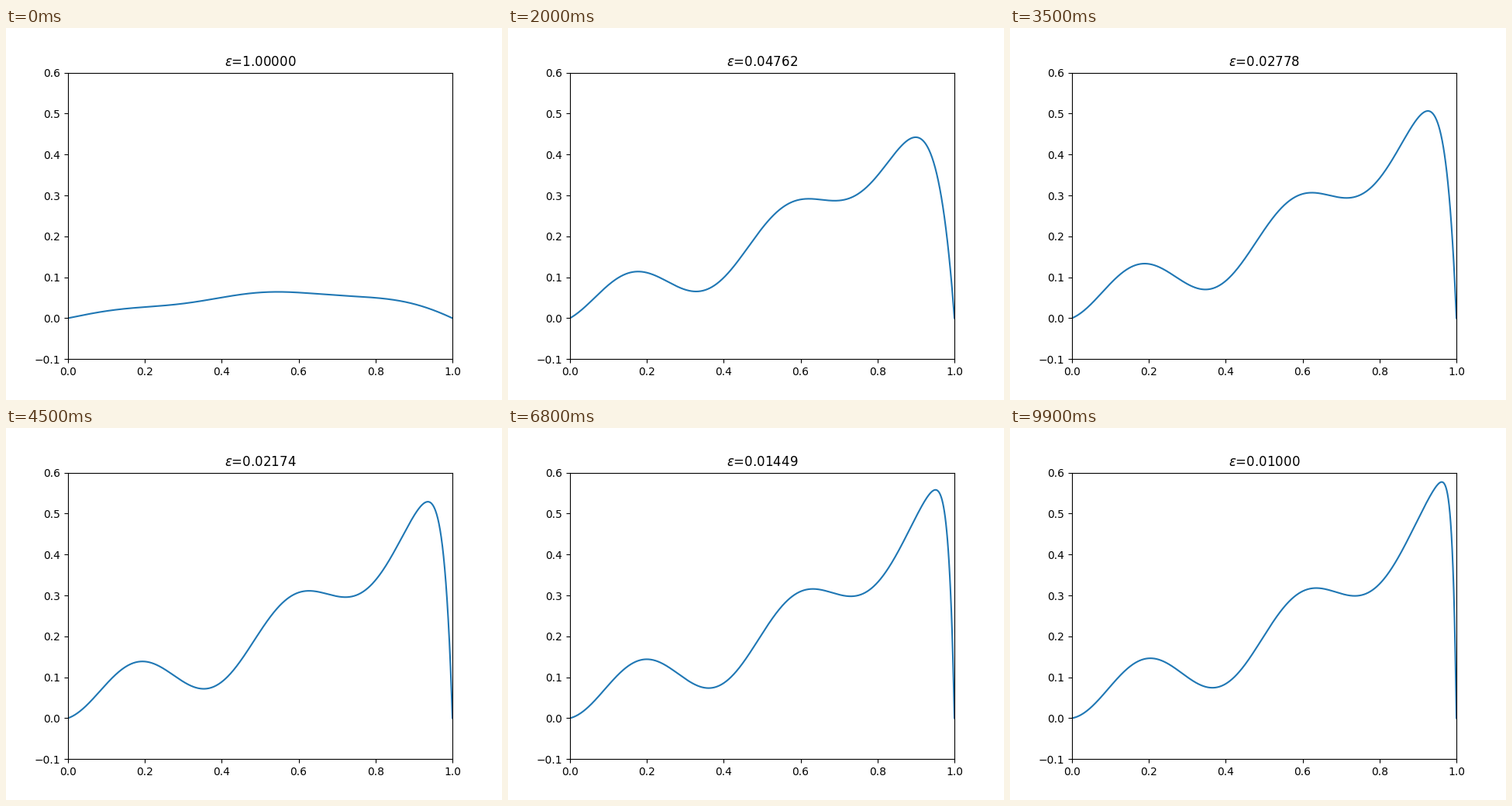
These frames come from a looping animation (640x480 px, 10 s). A matplotlib script:

```python
import numpy as np
import matplotlib.pyplot as plt
from matplotlib.animation import FuncAnimation

FRAMES, INTERVAL = 100, 100
K = 5 * np.pi
x = np.linspace(0, 1, 1001)


def solve(eps):
    """Solution of -eps u'' + u' = x + sin(5 pi x) with u(0) = u(1) = 0."""
    damp = 1 + (eps * K) ** 2
    a, b = -1 / (K * damp), eps / damp
    tail = np.exp(-1 / eps)
    layer = (2 * a - 0.5 - eps) / (1 - tail)
    const = -a - layer * tail
    smooth = x**2 / 2 + eps * x + a * np.cos(K * x) + b * np.sin(K * x)
    return smooth + const + layer * np.exp((x - 1) / eps)


fig, ax = plt.subplots(figsize=(6.4, 4.8), dpi=100)
ax.set_xlim(0, 1)
ax.set_ylim(-0.1, 0.6)
line, = ax.plot([], [])
title = ax.set_title("")


def update(i):
    eps = 1 / (i + 1)
    line.set_data(x, solve(eps))
    title.set_text(rf"$\varepsilon$={eps:.5f}")
    return line, title


anim = FuncAnimation(fig, update, frames=FRAMES, interval=INTERVAL,
                     repeat=True, repeat_delay=0, blit=False)
plt.show()
```
